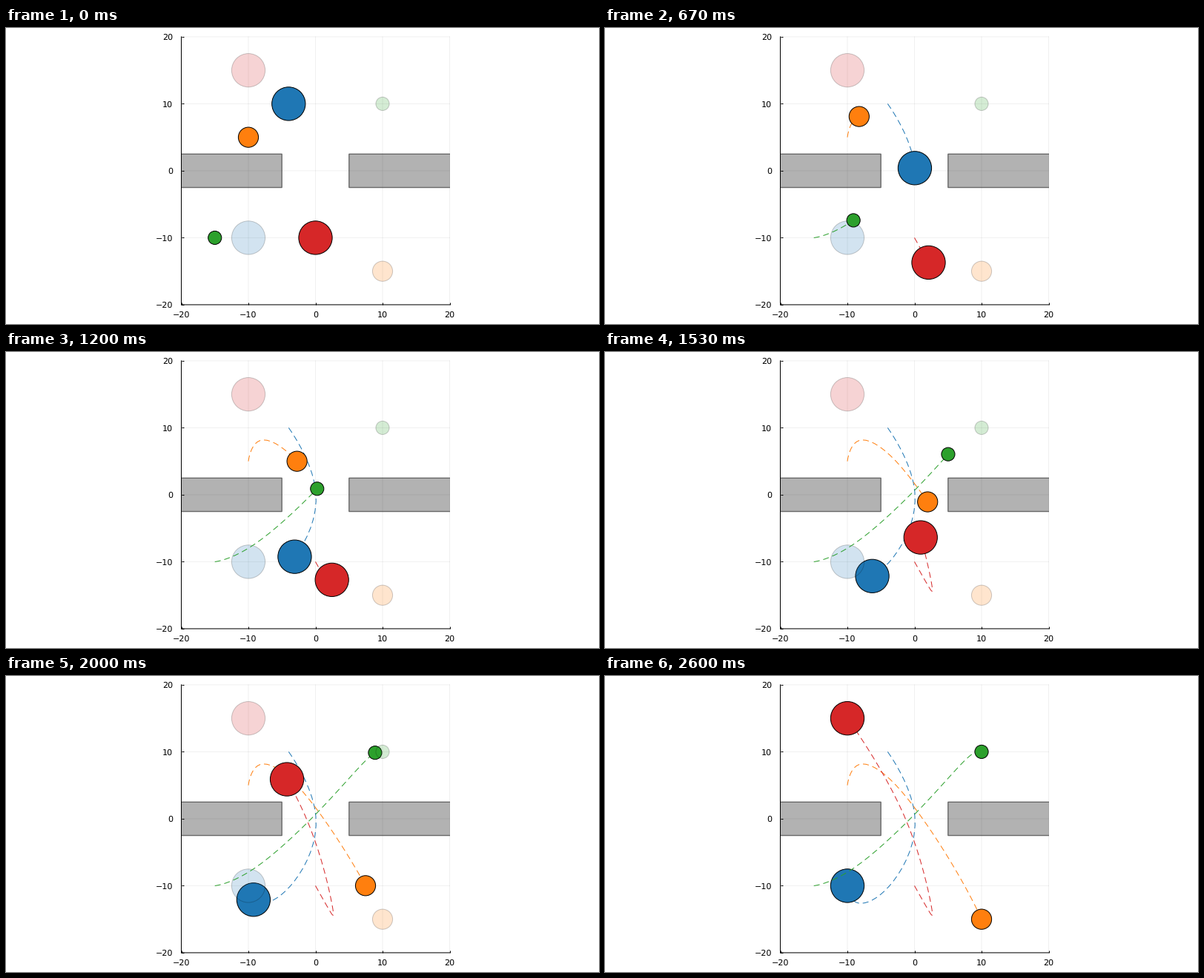
These frames come from a looping animation (800 by 400 pixels, 2670 ms). A matplotlib script:

```python
import numpy as np
import matplotlib.pyplot as plt
from matplotlib.animation import FuncAnimation
from matplotlib.patches import Circle, Rectangle

plt.rcParams["text.hinting"] = "none"

W, H, DPI = 800, 400, 100
PX = 72 / DPI  # one pixel in points
STEPS, FPS = 40, 15
LOOP_MS, TICK_MS = 2670, 10
LEFT, RIGHT, TOP, BOTTOM = 236.5, 598.5, 11.9, 373.95

# Every agent passes its five key points at these steps
KEY_STEPS = np.array([0, 10, 18, 27, 39])
AGENTS = [
    ("#1f77b4", 2.5, [(-4, 10), (0.05, 0.4), (-3.1, -9.25), (-8.3, -12.6), (-10, -10)]),
    ("#ff7f0e", 1.5, [(-10, 5), (-8.25, 8.1), (-2.75, 5), (5.45, -6.5), (10, -15)]),
    ("#2ca02c", 1.0, [(-15, -10), (-9.1, -7.4), (0.25, 0.9), (7.65, 8.85), (10, 10)]),
    ("#d62728", 2.5, [(0, -10), (2.1, -13.7), (2.45, -12.7), (-1.6, 0.6), (-10, 15)]),
]


def smooth_path(points):
    """Cubic spline through the key points, at rest at both ends."""
    t, p = KEY_STEPS, np.array(points, float)
    n, h = len(t), np.diff(t)
    slope = np.diff(p, axis=0) / h[:, None]
    a, b = np.eye(n), np.zeros((n, 2))
    for i in range(1, n - 1):
        a[i, i - 1:i + 2] = h[i], 2 * (h[i - 1] + h[i]), h[i - 1]
        b[i] = 3 * (h[i] * slope[i - 1] + h[i - 1] * slope[i])
    v = np.linalg.solve(a, b)

    k = np.arange(STEPS)
    j = np.clip(np.searchsorted(t, k, side="right") - 1, 0, n - 2)
    step = h[j][:, None]
    s = (k - t[j])[:, None] / step
    blend = s * s * (3 - 2 * s)
    return (p[j] * (1 - blend) + p[j + 1] * blend
            + step * (s * (1 - s) ** 2 * v[j] + s * s * (s - 1) * v[j + 1]))


fig = plt.figure(figsize=(W / DPI, H / DPI), dpi=DPI, facecolor="white")
ax = fig.add_axes([LEFT / W, 1 - BOTTOM / H, (RIGHT - LEFT) / W, (BOTTOM - TOP) / H])
ax.set(xlim=(-20, 20), ylim=(-20, 20))
ax.spines[["top", "right"]].set_visible(False)
ax.spines[["left", "bottom"]].set(linewidth=PX, snap=False)
ax.patch.set_visible(False)
ticks = range(-20, 21, 10)
ax.set_xticks(ticks)
ax.set_yticks(ticks)
ax.tick_params(direction="in", length=3 * PX, width=PX,
               labelbottom=False, labelleft=False)


def label(x, y, value, align):
    fig.text(x / W, 1 - y / H, str(value).replace("-", "\u2212"), ha=align,
             va="baseline", fontsize=8, family="DejaVu Sans")


for value in ticks:
    grid = dict(color=(0, 0, 0, 0.06), lw=PX, zorder=0, clip_on=False, snap=False)
    ax.plot([value, value], [-20, 20], **grid)
    ax.plot([-20, 20], [value, value], **grid)
    shift = (value + 20) / 40
    label(LEFT + shift * (RIGHT - LEFT), 391, value, "center")
    label(225, BOTTOM - shift * (BOTTOM - TOP) + 4, value, "right")

# Walls either side of the gap
for x in (-25, 5):
    ax.add_patch(Rectangle((x, -2.5), 20, 5, facecolor=(0, 0, 0, 0.3), snap=False,
                           edgecolor=(0, 0, 0, 0.5), lw=1.4 * PX, zorder=1))


def disc(center, radius, color, alpha, zorder):
    return ax.add_patch(Circle(center, radius, facecolor=color, edgecolor="black",
                               alpha=alpha, lw=PX, zorder=zorder))


movers = []
for i, (color, radius, points) in enumerate(AGENTS):
    path = smooth_path(points)
    z = 3 + 3 * i
    trail, = ax.plot([], [], color=color, lw=PX, ls=(0, (8, 5)),
                     dash_capstyle="butt", zorder=z)
    body = disc(path[0], radius, color, 1, z + 1)
    disc(path[-1], radius, color, 0.2, z + 2)
    movers.append((path, trail, body))

# Steps run at 15 per second, with their starts rounded to the 10 ms clock
step_starts = np.round(np.arange(STEPS) * 1000 / FPS / TICK_MS)


def update(tick):
    k = np.searchsorted(step_starts, tick, side="right") - 1
    for path, trail, body in movers:
        trail.set_data(path[:k + 1, 0], path[:k + 1, 1])
        body.center = path[k]
    return [artist for _, *pair in movers for artist in pair]


anim = FuncAnimation(fig, update, frames=LOOP_MS // TICK_MS,
                     init_func=lambda: update(0), interval=TICK_MS,
                     repeat=True, repeat_delay=0)
plt.show()
```
